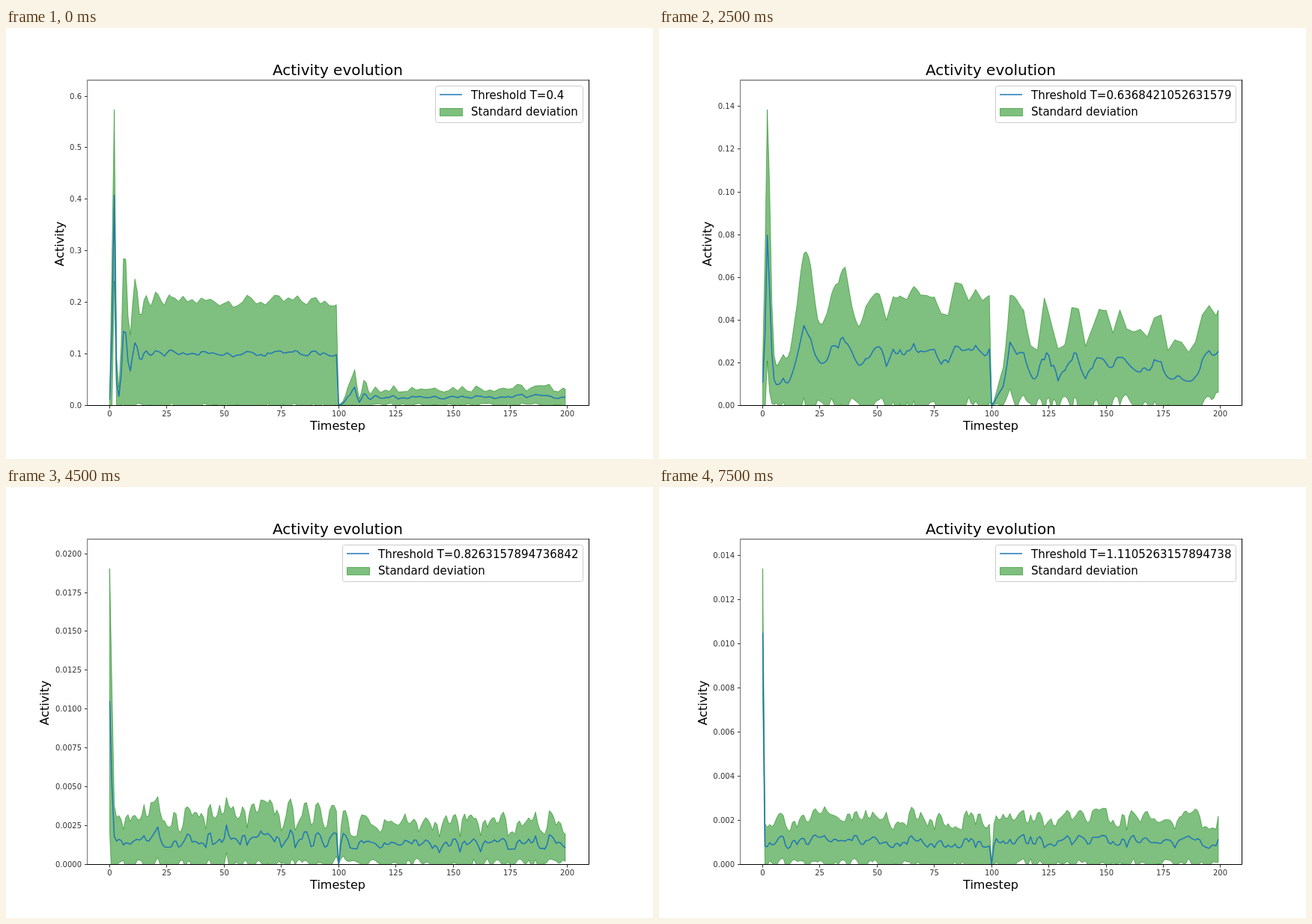
Animation, 864 px wide and 576 px high, one loop 8000 ms. Source, as an HTML page:

```html
<!DOCTYPE html>
<html lang="en">
<head>
<meta charset="utf-8">
<title>Activity evolution</title>
<style>
html, body { margin: 0; width: 100%; height: 100%; overflow: hidden; background: #fff; }
svg { display: block; width: 864px; height: 576px; font-family: "DejaVu Sans", Verdana, sans-serif; }
.ticks text { font-size: 10px; fill: #333; }
.ticks path { stroke: #333; }
.mid { text-anchor: middle; }
.end { text-anchor: end; }
.label { font-size: 16px; }
.band { fill: rgba(0, 128, 0, .5); stroke: rgba(0, 128, 0, .5); }
.mean { fill: none; stroke: #1f77b4; stroke-width: 1.5; stroke-linejoin: round; }
.legend text { font-size: 15px; }
</style>
</head>
<body>
<svg viewBox="0 0 864 576">
  <clipPath id="plot"><rect x="108" y="69" width="670" height="435.5"/></clipPath>
  <g clip-path="url(#plot)">
    <path class="band" id="band"/>
    <path class="mean" id="mean"/>
  </g>
  <g fill="none">
    <path d="M108 70.5H778" stroke="#ccc"/>
    <path d="M108.5 505V69.5H778" stroke="#777"/>
    <path d="M108 504.5H778.5V69" stroke="#000"/>
  </g>
  <g class="ticks" id="xticks"></g>
  <g class="ticks" id="yticks"></g>
  <text class="mid" x="443" y="63" font-size="20">Activity evolution</text>
  <text class="mid label" x="443" y="537">Timestep</text>
  <text class="mid label" id="ylabel">Activity</text>
  <g class="legend">
    <rect id="box" y="77.5" height="49" rx="3" fill="#fff" fill-opacity=".8" stroke="#ccc"/>
    <g id="entries">
      <path class="mean" d="M-42 89h30"/>
      <rect class="band" x="-41.5" y="107.5" width="30" height="10"/>
      <text id="threshold" y="95"></text>
      <text id="deviation" y="117">Standard deviation</text>
    </g>
  </g>
</svg>
<script>
const STEP_MS = 500, STEPS = 16, SAMPLES = 200, RESET = 100;
const BASE = 504, HEIGHT = 434.9, PEAK = 395, START = 0.0105;
const el = id => document.getElementById(id);

// How the response looks at a few thresholds; those between are interpolated.
//   top: end of the y axis           peak, ratio: time of the first spike, mean / band edge there
//   fall: how fast the spike drops   level, later: band edge in px before and after the reset
//   swing, period, decay: the damped oscillation that follows
//   restart: steps from the reset to the next spike
//   span, rough, roughLater: length and strength of the noise
const silent = { peak: 0, ratio: .6, swing: 0, period: 8, decay: 8, restart: 1 };
const excitable = { ...silent, top: .02094, fall: .83, level: 66, later: 54, span: 1.5, rough: .38, roughLater: .33 };
const keys = [
  { step: 0, top: .6312, peak: 2, ratio: .71, fall: 1.5, level: 139, later: 23, swing: 1.3,
    period: 4.6, decay: 5, restart: 7, span: 2, rough: .06, roughLater: .25 },
  { step: 2, top: .677, peak: 2, ratio: .58, fall: 1.3, level: 117, later: 26, swing: 1.14,
    period: 5.3, decay: 7, restart: 7.5, span: 2, rough: .07, roughLater: .25 },
  { step: 4, top: .466, peak: 3, ratio: .57, fall: 1.05, level: 117, later: 65, swing: 1.15,
    period: 8.5, decay: 23, restart: 12, span: 2.5, rough: .06, roughLater: .28 },
  { step: 6, top: .0498, peak: 1, ratio: .58, fall: .13, level: 152, later: 148, swing: .35,
    period: 24, decay: 30, restart: 4, span: 3.5, rough: .34, roughLater: .4 },
  { ...excitable, step: 8, top: .0222 },
  { ...excitable, step: 9 },
  { ...silent, step: 11, top: .01823, fall: 2.5, level: 57, later: 53, span: 1.5, rough: .33, roughLater: .28 },
  { ...silent, step: 15, top: .01476, fall: 2.5, level: 61, later: 60, span: 1.5, rough: .28, roughLater: .25 }
];

const mix = (a, b, f) => a + (b - a) * f;

function response(step) {
  const next = Math.max(1, keys.findIndex(k => k.step >= step));
  const a = keys[next - 1], b = keys[next];
  const f = (step - a.step) / (b.step - a.step);
  const out = {};
  for (const name in a) out[name] = mix(a[name], b[name], f);
  out.peak = Math.round(out.peak);
  out.top = a.top * (b.top / a.top) ** f;
  return out;
}

function random(i, seed) {
  const v = Math.sin(i * 12.9898 + seed * 78.233) * 43758.5453;
  return 2 * (v - Math.floor(v)) - 1;
}

function noise(x, seed) {
  const i = Math.floor(x);
  return mix(random(i, seed), random(i + 1, seed), x - i);
}

const ring = (r, t) => Math.exp(-t / r.decay) * Math.cos(2 * Math.PI * t / r.period);

function edgeBefore(r, t, start) {
  if (t < r.peak) return Math.max(2 * start, PEAK * t / r.peak);
  const since = t - r.peak;
  const wave = r.swing * ring(r, Math.max(since, r.period / 2));
  const calm = r.level * (1 + wave) * (1 + r.rough * noise(t / r.span, r.step));
  return mix(calm, PEAK, Math.exp(-((r.fall * since) ** 2)));
}

function edgeAfter(r, t) {
  const since = t - RESET;
  const echo = r.swing * (1 - r.later / r.level);
  const shape = since < r.restart
    ? (1 + echo) * (since / r.restart) ** 1.5
    : 1 + echo * ring(r, since - r.restart);
  return r.later * shape * (1 + r.roughLater * noise(t / r.span, r.step));
}

function series(r) {
  const start = START / r.top * HEIGHT;
  const times = [...Array(SAMPLES).keys()];
  const upper = times.map(t => t < RESET ? edgeBefore(r, t, start) : edgeAfter(r, t));
  const mean = upper.map((u, t) => {
    if (t === 0) return start;
    if (t === r.peak) return u * r.ratio;
    const drift = (t < RESET ? r.rough : r.roughLater) / 2;
    return u * (.495 + .5 * drift * noise(t / 1.5, r.step + 50));
  });
  return { upper, mean, lower: mean.map((m, t) => 2 * m - upper[t]) };
}

const xAt = t => 138.5 + t * 3.0573;
const trace = values => values.map((v, t) => [xAt(t).toFixed(2), (BASE - v).toFixed(2)]);
const join = pts => "M" + pts.join("L");

function tickStep(top) {
  for (let e = -4; ; e++)
    for (const m of [1, 2, 2.5, 5])
      if (top / (m * 10 ** e) <= 9)
        return { size: m * 10 ** e, digits: Math.max(0, -e) + (m === 2.5 ? 1 : 0) };
}

function drawAxis(top) {
  const { size, digits } = tickStep(top);
  let out = "";
  for (let i = 0; i * size < top; i++) {
    const y = Math.round(BASE - i * size / top * HEIGHT) + .5;
    out += `<path d="M105 ${y}h3.5"/><text class="end" x="101" y="${y + 3.5}">${(i * size).toFixed(digits)}</text>`;
  }
  el("yticks").innerHTML = out;
  el("ylabel").setAttribute("transform", `translate(${76.5 - 6.36 * (digits - 1)} 288.5) rotate(-90)`);
}

function drawLegend(step) {
  el("threshold").textContent = "Threshold T=" + (0.4 + step * (0.9 / 19));
  const width = Math.max(...["threshold", "deviation"].map(id => el(id).getComputedTextLength()));
  const left = Math.round(764 - width);
  el("entries").setAttribute("transform", `translate(${left} 0)`);
  el("box").setAttribute("x", left - 47.5);
  el("box").setAttribute("width", 818 - left);
}

function draw(step) {
  const r = response(step);
  const { upper, mean, lower } = series(r);
  el("band").setAttribute("d", join([...trace(upper), ...trace(lower).reverse()]) + "Z");
  el("mean").setAttribute("d", join(trace(mean)));
  drawAxis(r.top);
  drawLegend(step);
}

for (let t = 0; t <= 200; t += 25) {
  const x = Math.floor(xAt(t)) + .5;
  el("xticks").innerHTML += `<path d="M${x} 504.5v4"/><text class="mid" x="${x}" y="519">${t}</text>`;
}

let shown = -1;
function tick() {
  const step = Math.floor(performance.now() / STEP_MS) % STEPS;
  if (step !== shown) draw(shown = step);
  requestAnimationFrame(tick);
}
tick();
</script>
</body>
</html>
```
